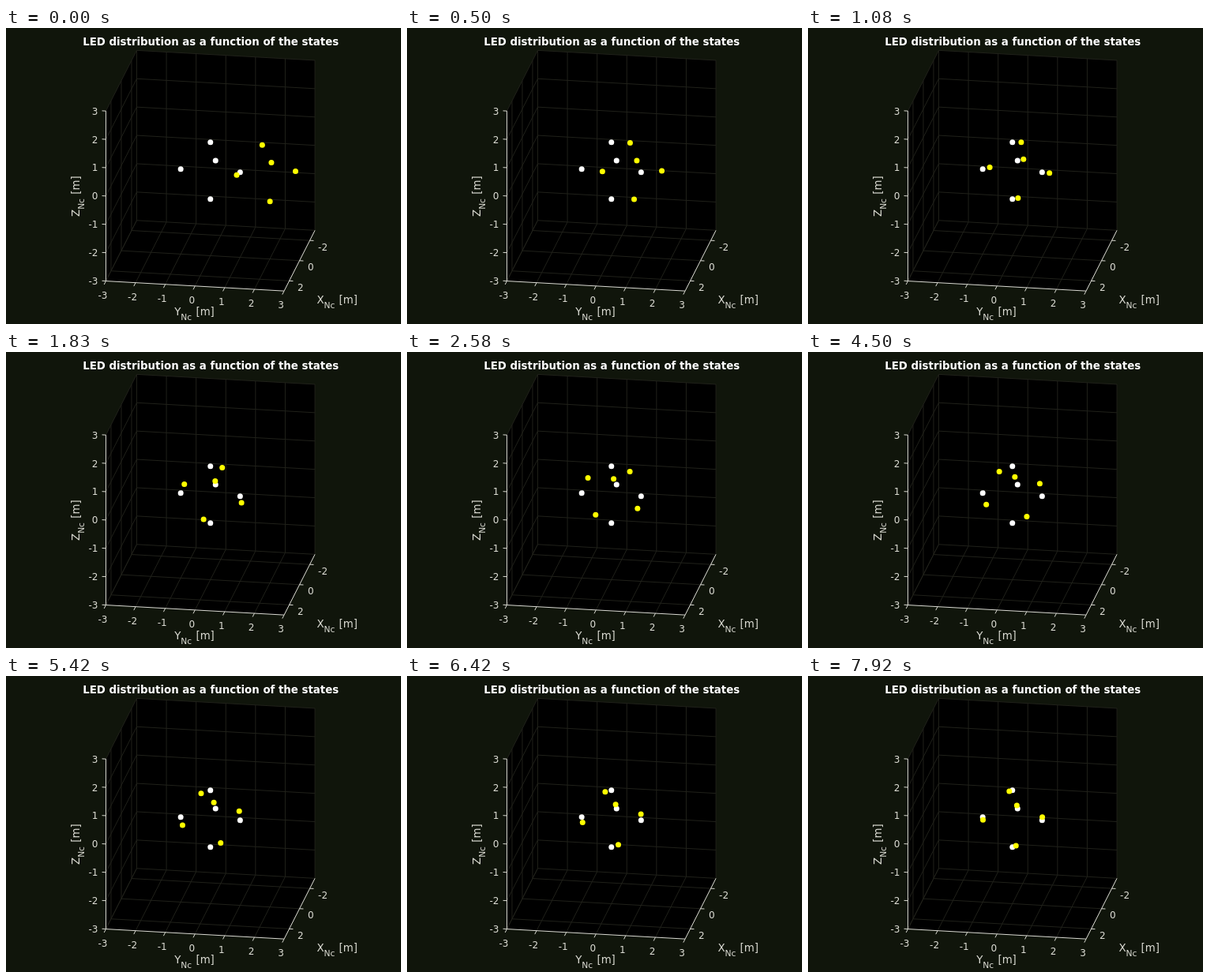
Recreate the animation shown at these times as an HTML page. Size 500 by 375 pixels, loop 8000 ms.

```html
<!DOCTYPE html>
<html lang="en">
<head>
<meta charset="utf-8">
<title>LED distribution</title>
<style>
  html, body { margin: 0; width: 100%; height: 100%; overflow: hidden; background: #10150b; }
  svg { display: block; width: 500px; height: 375px; }
  text { font: 12px "DejaVu Sans", sans-serif; fill: #dcdcd4; }
  .title { font-weight: bold; font-size: 13.33px; fill: #fff; }
  .label { font-size: 13.33px; }
  .sub { font-size: 10.67px; }
  .grid { stroke: #20211a; }
  .axis { stroke: #d9d9d2; }
</style>
</head>
<body>
<svg id="stage" viewBox="0 0 500 375"></svg>
<script>
const LOOP = 8000, STEP = 1000 / 12;
const stage = document.getElementById('stage');

function add(tag, attributes, text = '') {
  const node = document.createElementNS('http://www.w3.org/2000/svg', tag);
  for (const name in attributes) node.setAttribute(name, attributes[name]);
  node.textContent = text;
  stage.append(node);
  return node;
}

const project = ([x, y, z]) => [
  258.75 - 6.5 * x + 37.6 * y,
  180.75 + 12.8 * x + 2.1 * y - 35.9 * z
];

function line(from, to, kind) {
  const [x1, y1] = project(from), [x2, y2] = project(to);
  add('line', { x1, y1, x2, y2, class: kind });
}

function label(x, y, text, anchor = 'middle') {
  add('text', { x, y, 'text-anchor': anchor }, text);
}

function axisLabel(letter, transform) {
  const node = add('text', { transform, class: 'label' }, letter);
  for (const [text, attributes] of [['Nc', { dy: 6, class: 'sub' }], [' [m]', { dx: 1, dy: -6 }]])
    node.append(add('tspan', attributes, text));
}

function drawAxes() {
  const outline = [[3, -3, 3], [-3, -3, 3], [-3, 3, 3], [-3, 3, -3], [3, 3, -3], [3, -3, -3]];
  add('polygon', { points: outline.map(project).join(' '), fill: '#000' });

  for (let v = -3; v <= 3; v++) {
    line([-3, v, -3], [-3, v, 3], 'grid');
    line([-3, v, -3], [3, v, -3], 'grid');
    line([-3, -3, v], [-3, 3, v], 'grid');
    line([-3, -3, v], [3, -3, v], 'grid');
  }
  for (const v of [-2, 0, 2]) {
    line([v, -3, -3], [v, -3, 3], 'grid');
    line([v, -3, -3], [v, 3, -3], 'grid');
  }

  line([3, -3, -3], [3, -3, 3], 'axis');
  line([3, -3, -3], [3, 3, -3], 'axis');
  line([3, 3, -3], [-3, 3, -3], 'axis');

  // Ticks point outwards from the box.
  for (let v = -3; v <= 3; v++) {
    line([3, -3, v], [3, -3.13, v], 'axis');
    line([3, v, -3], [3.35, v, -3], 'axis');
    label(116.5, project([3, -3, v])[1] + 4.5, v, 'end');
    const [x, y] = project([3, v, -3]);
    label(x - 4, y + 22, v);
  }
  for (const v of [-2, 0, 2]) {
    line([v, 3, -3], [v, 3.13, -3], 'axis');
    const [x, y] = project([v, 3, -3]);
    label(x + 10.5, y + 12.7, v, 'start');
  }

  add('text', { x: 259.2, y: 22, 'text-anchor': 'middle', class: 'title' },
    'LED distribution as a function of the states');
  axisLabel('X', 'translate(393.4 348.5)');
  axisLabel('Y', 'translate(213.2 364)');
  axisLabel('Z', 'translate(92.5 239)rotate(-90)');
}

// seconds, roll in degrees, tilt along Y, tilt along Z, height
const poses = [
  [0, -7.3, 0.005, 0.017, 0.02],
  [1.083, 3.3, -0.042, 0.03, 0.033],
  [2.583, 35.5, -0.139, 0.152, 0.054],
  [3.667, 54.2, -0.142, 0.265, 0.03],
  [4.5, 64.6, -0.105, 0.26, 0.022],
  [6.417, 78.5, -0.04, 0.134, 0.015],
  [7.917, 84.5, -0.03, 0.1, 0.008]
];

// Smooth cubic curve through one column of the poses.
function curve(column) {
  const slope = i => (poses[i + 1][column] - poses[i][column]) / (poses[i + 1][0] - poses[i][0]);
  const last = poses.length - 1;
  const tangent = i => {
    if (i === 0) return 2 * slope(0) - tangent(1);
    if (i === last) return 2 * slope(last - 1) - tangent(last - 1);
    const before = poses[i][0] - poses[i - 1][0], after = poses[i + 1][0] - poses[i][0];
    return (before * slope(i) + after * slope(i - 1)) / (before + after);
  };
  return t => {
    let i = 0;
    while (i < last - 1 && t > poses[i + 1][0]) i++;
    const h = poses[i + 1][0] - poses[i][0], u = (t - poses[i][0]) / h, w = 1 - u;
    return poses[i][column] * w * w * (1 + 2 * u) + poses[i + 1][column] * u * u * (3 - 2 * u)
      + h * u * w * (tangent(i) * w - tangent(i + 1) * u);
  };
}

const [rollAt, tiltYAt, tiltZAt, heightAt] = [1, 2, 3, 4].map(curve);
const body = [[0, -1, 0], [0, 0, 1], [0, 1, 0], [0, 0, -1], [-1, 0, 0]];

function placeBody(dots, t) {
  const roll = rollAt(t) * Math.PI / 180, cos = Math.cos(roll), sin = Math.sin(roll);
  const b = tiltYAt(t), c = tiltZAt(t), a = Math.sqrt(1 - b * b - c * c);
  const shift = 1.795 * Math.exp(-2.1 * t) + 0.08 * Math.exp(-0.3 * t);
  const height = heightAt(t);
  body.forEach(([x, y, z], i) => {
    const ry = y * cos + z * sin, rz = z * cos - y * sin;
    const lean = ry * b + rz * c, pull = -x - lean / (1 + a);
    move(dots[i], [a * x + lean, ry + b * pull + shift, rz + c * pull + height]);
  });
}

function move(dot, point) {
  const [cx, cy] = project(point);
  dot.setAttribute('cx', cx);
  dot.setAttribute('cy', cy);
}

drawAxes();
const makeDots = fill => body.map(() => add('circle', { r: 3.5, fill }));
makeDots('#fff').forEach((dot, i) => move(dot, body[i]));
const moving = makeDots('#ff0');

function render(now) {
  const tick = Math.min(95, Math.floor((now % LOOP + 4) / STEP));
  placeBody(moving, tick * STEP / 1000);
  requestAnimationFrame(render);
}
render(performance.now());
</script>
</body>
</html>
```
